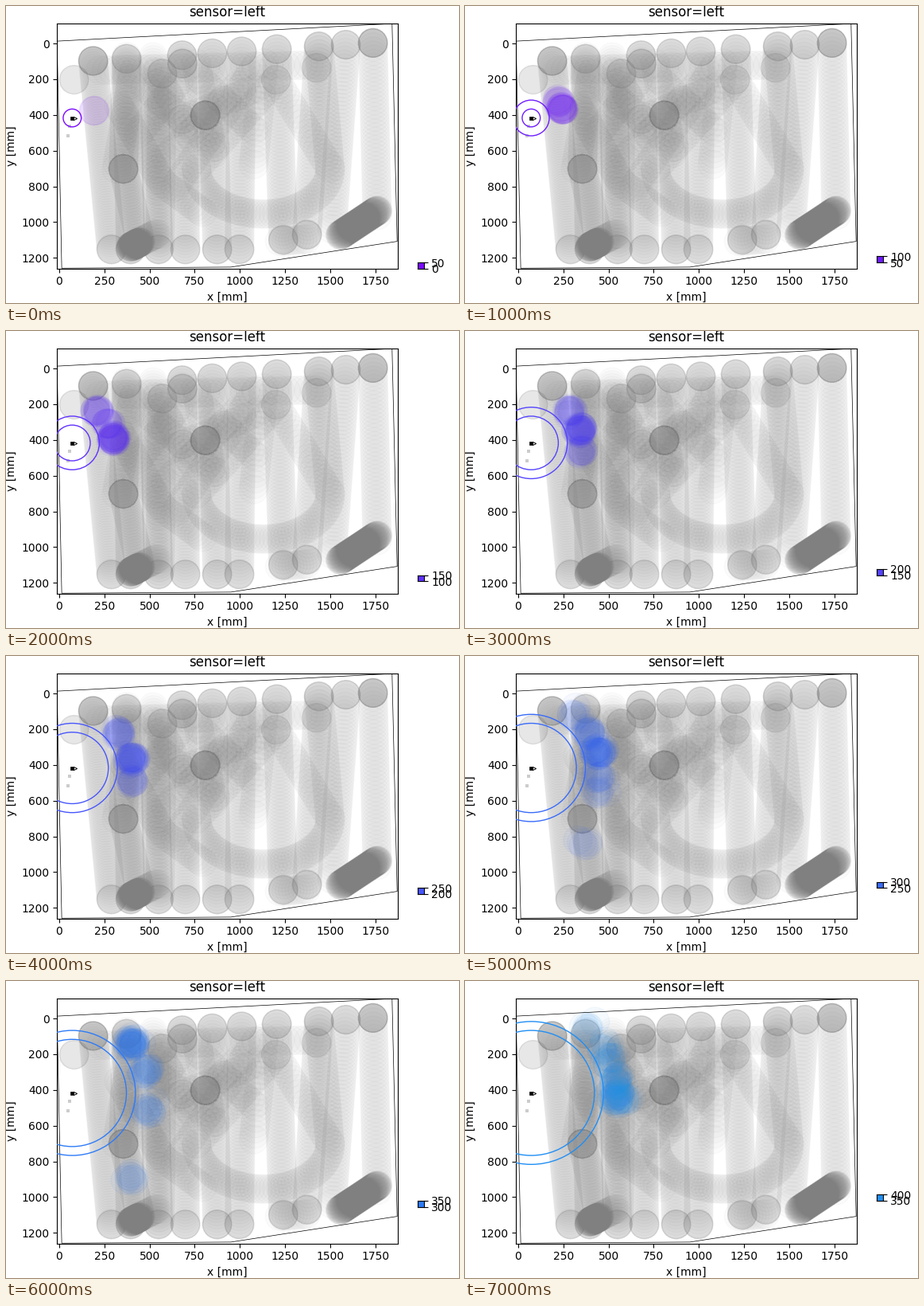
Recreate the animation shown at these times as a matplotlib script. Size 570 by 373 pixels, loop 8000 ms.

```python
import numpy as np
import matplotlib.pyplot as plt
from matplotlib.animation import FuncAnimation
from matplotlib.collections import PatchCollection
from matplotlib.patches import Circle, Polygon

W, H = 570, 373
BIN, BINS, FRAMES = 50, 40, 8
DISC = 80                      # robot radius in mm
HOME = (72, 417)
BOTTOM, HEIGHT = 43.3, 308
CELL = HEIGHT / BINS           # height of one colour bar cell in px

# x at the upper and lower end of each lane
TOPS = np.array([188, 373, 520, 680, 847, 1010, 1204, 1437, 1586, 1736])
ENDS = np.array([289, 395, 550, 698, 874, 997, 1240, 1371, 1510, 1760])

# Directions of the readings per distance bin in degrees, strongest first
BEARINGS = [
    [-19], [-17, -32], [-6, -52, -28], [-15, -40, 10], [-9, -38, 13],
    [-13, -32, 7, -52, 18, 55], [-40, -17, 12, 57], [3, -8, -23, -32, -48],
]


def run(step, *points):
    """Evenly spaced positions on a polyline."""
    pts = np.array(points, float)
    dist = np.r_[0, np.cumsum(np.hypot(*np.diff(pts, axis=0).T))]
    at = np.arange(0, dist[-1], step)
    return np.c_[np.interp(at, dist, pts[:, 0]), np.interp(at, dist, pts[:, 1])]


def rest(x, y, visits):
    return np.tile((x, y), (visits, 1))


def drive():
    """All places the robot has been."""
    rng = np.random.default_rng(4)
    top_y = 110 - 0.065 * TOPS
    end_y = 1153 - 0.22 * np.maximum(0, ENDS - 997)
    last = len(TOPS) - 1
    parts = []

    for i, (x0, y0, x1, y1) in enumerate(zip(TOPS, top_y, ENDS, end_y)):
        parts.append(run(14 + i, (x0, y0), (x1, y1)))
        if i != 2:
            parts.append(rest(x0, y0, 15 if i in (0, last) else 8))
        if i < 8:
            parts.append(rest(x1, y1, 8))

    # Round trip on the right: half an ellipse closed over its top
    t = np.linspace(0, np.pi, 40)
    arc = np.c_[1130 + 370 * np.cos(t), 700 + 255 * np.sin(t)]
    peak = (1200, 203)
    parts += [run(21, *arc), run(32, arc[-1], peak), run(32, peak, arc[0])]

    # Cross trips and the band below the upper border
    parts += [
        run(32, (230, 150), (1424, 120)),
        run(24, (1437, 11), (1498, 702)),
        run(17, (373, 74), (355, 702), (450, 1110)),
        run(24, (330, 350), (570, 780), (800, 950)),
        run(22, (570, 168), (557, 1157)),
        run(18, (1221, 1108), (1371, 1095)),
    ]
    for _ in range(11):
        x0, x1 = 230 + 950 * rng.random(2) ** 1.6
        y0, y1 = rng.uniform(80, 250), rng.uniform(450, 850)
        parts.append(run(30, (x0, y0), (x1, y1)))
    trail = np.vstack(parts)

    # Long stops and slow manoeuvres
    stops = [(82, 203, 6), (808, 402, 18), (355, 702, 16), (682, 112, 9),
             (570, 168, 6), (1424, 136, 5), (*peak, 4)]
    slow = [run(1, (395, 1140), (450, 1110)), run(7, (450, 1110), (540, 1065)),
            run(1.5, (1555, 1073), (1762, 934))]
    return np.vstack([trail, *(rest(*s) for s in stops), *slow])


def readings(k):
    """Places where the sensor measured a distance in bin k."""
    rng = np.random.default_rng(100 + k)
    total = min(3 + 13 * k, 30)
    spots = []
    for rank, deg in enumerate(BEARINGS[k], 1):
        reach = (k + 0.5) * BIN + 105 + 3 * max(0, deg - 10)
        a = np.radians(deg)
        center = np.add(HOME, (reach * np.cos(a), reach * np.sin(a)))
        spots.append(rng.normal(center, 3 + 2.5 * k, (total // rank, 2)))
    return np.vstack(spots)


def discs(centers, color, alpha, z):
    shapes = [Circle(c, DISC) for c in centers]
    return PatchCollection(shapes, facecolor=color, edgecolor=color,
                           linewidth=1, alpha=alpha, zorder=z)


def px_box(x, y, w, h):
    return [x / W, y / H, w / W, h / H]


fig = plt.figure(figsize=(W / 100, H / 100), dpi=100, facecolor="white")
ax = fig.add_axes(px_box(64.2, BOTTOM, 428.4, HEIGHT))
ax.set(xlim=(-12, 1872), ylim=(1260, -113), xlabel="x [mm]", ylabel="y [mm]",
       title="sensor=left")
ax.set_xticks(range(0, 1751, 250))
ax.set_yticks(range(0, 1201, 200))
bar = fig.add_axes(px_box(517.9, BOTTOM, CELL, CELL))
bar.yaxis.tick_right()
bar.set_xticks([])

ax.add_collection(discs(drive(), "gray", 0.03, 1))
border = [(-12, -13), (1842, -111), (1870, 1108), (950, 1252), (14, 1258)]
ax.add_patch(Polygon(border, fill=False, lw=0.5, zorder=2.3))
ax.plot([57, 48], [463, 516], "s", color="0.8", ms=2.6, mew=0, zorder=2)
ax.plot(*HOME, "s", color="k", ms=2.4, mew=0.5, zorder=5)
ax.plot(HOME[0] + 18, HOME[1], ">", mfc="white", mec="k", ms=3, mew=0.7,
        zorder=4)

rings = [ax.add_patch(Circle(HOME, 1, fill=False, lw=1, zorder=3))
         for _ in range(2)]
moving = []


def draw(k):
    while moving:
        moving.pop().remove()
    color = plt.cm.rainbow((k + 0.5) / BINS)
    low, high = k * BIN, (k + 1) * BIN
    for ring, radius in zip(rings, (low, high)):
        ring.set_radius(radius)
        ring.set_edgecolor(color)
        ring.set_visible(radius > 0)
    moving.append(ax.add_collection(discs(readings(k), color, 0.045, 2)))

    bar.set_position(px_box(517.9, BOTTOM + CELL * k, CELL, CELL))
    bar.set_facecolor(color)
    bar.set_ylim(low, high)
    bar.set_yticks([low, high])
    return rings + moving


anim = FuncAnimation(fig, draw, frames=FRAMES, interval=1000, repeat=True,
                     blit=False)
plt.show()
```
